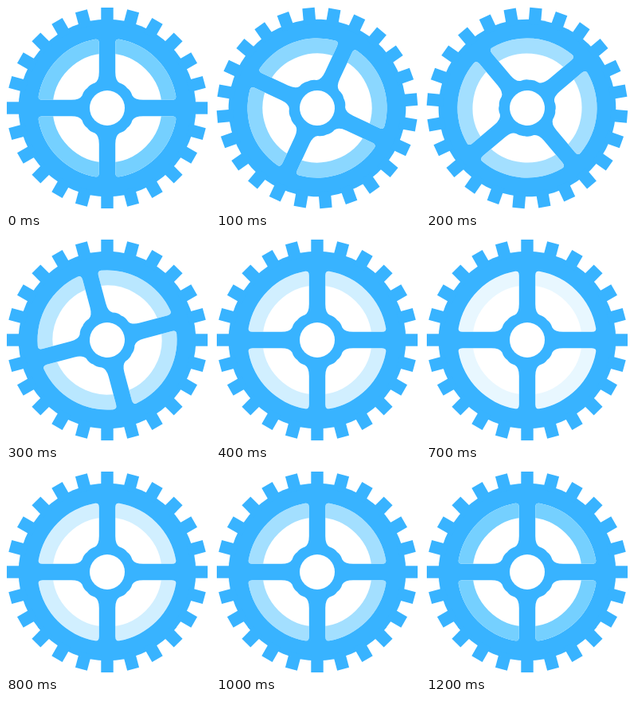
An HTML page for the animation above (1300 ms loop, 256x256 px).

```html
<!DOCTYPE html>
<html lang="en">
<head>
<meta charset="utf-8">
<title>Gear</title>
<style>
  html, body { margin: 0; width: 100%; height: 100%; overflow: hidden; background: #fff; }
  svg { display: block; width: 100vw; height: 100vh; }
</style>
</head>
<body>
<svg viewBox="0 0 256 256">
  <defs>
    <path id="pane" d="M10.2 -81 L10.2 -45 Q10.2 -34.5 15.5 -31.5 Q22 -29.5 25 -25 Q29.5 -22 31.5 -15.5 Q34.5 -10.2 45 -10.2 L81 -10.2 Q87 -10.2 86.2 -15 A87.5 87.5 0 0 0 15 -86.2 Q10.2 -87 10.2 -81 Z"/>
    <clipPath id="panes">
      <use href="#pane"/>
      <use href="#pane" transform="rotate(90)"/>
      <use href="#pane" transform="rotate(180)"/>
      <use href="#pane" transform="rotate(270)"/>
    </clipPath>
  </defs>
  <g transform="translate(127 128)">
    <g id="gear">
      <g id="teeth" fill="#38b3ff"><circle r="111.3"/></g>
      <circle r="22" fill="#fff"/>
      <g clip-path="url(#panes)">
        <circle r="90" fill="#fff"/>
        <circle id="glow" r="79" fill="none" stroke="#75d0ff" stroke-width="21"/>
      </g>
    </g>
  </g>
</svg>
<script>
  const LOOP = 1300, STEP = 100, TURN = 360, FADE = 600;
  const TEETH = 24;
  const byId = id => document.getElementById(id);
  const gear = byId('gear'), glow = byId('glow'), teeth = byId('teeth');

  for (let i = 0; i < TEETH; i++) {
    const tooth = document.createElementNS('http://www.w3.org/2000/svg', 'path');
    tooth.setAttribute('d', 'M-7.7 -105 V-126 H7.7 V-105 Z');
    tooth.setAttribute('transform', `rotate(${i * 360 / TEETH})`);
    teeth.append(tooth);
  }

  // A quarter turn, while the glow fades out and back in.
  function draw(now) {
    const t = Math.floor(now % LOOP / STEP) * STEP;
    const angle = 90 * Math.min(1, t / TURN);
    gear.setAttribute('transform', `rotate(${angle})`);
    glow.setAttribute('opacity', Math.abs(1 - t / FADE));
  }

  const start = performance.now();
  function tick() {
    draw(performance.now() - start);
    requestAnimationFrame(tick);
  }
  tick();
</script>
</body>
</html>
```
